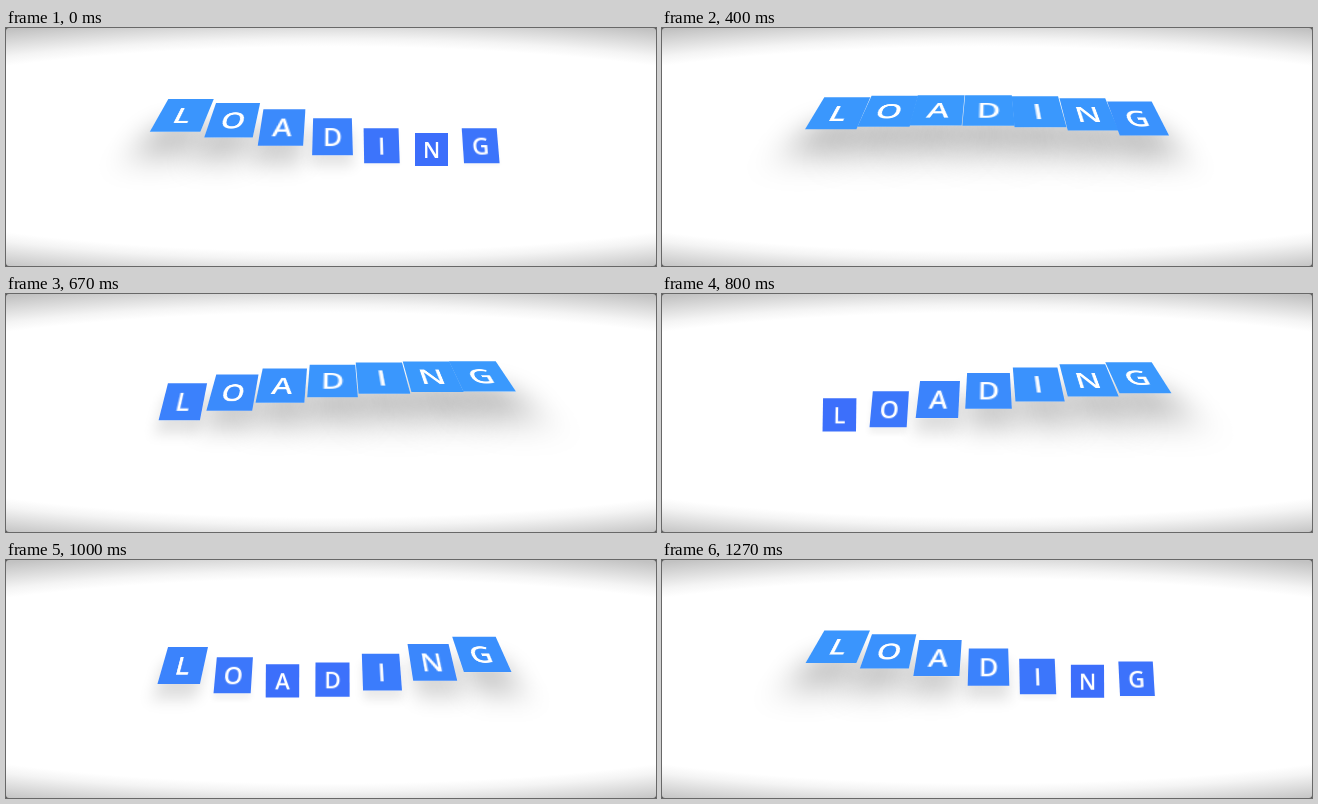
Recreate the animation shown at these times as an HTML page. Size 650 by 238 pixels, loop 1.34 s.

```html
<!DOCTYPE html>
<html lang="en">
<head>
<meta charset="utf-8">
<title>Loading</title>
<style>
html, body { margin: 0; width: 100%; height: 100%; overflow: hidden; background: #555; }
.stage {
  position: relative; width: 650px; height: 238px; overflow: hidden; border-radius: 3px;
  background: radial-gradient(717px 133px at 325px 121px, #fff 77%, #f4f4f4 83%, #c2c2c2 100%);
}
.row { position: absolute; left: 161px; top: 105px; width: 330px; height: 33px; perspective: 200px; }
.row span {
  position: absolute; width: 33px; height: 33px;
  font: 600 22px/33px "Open Sans", "Noto Sans", sans-serif;
  text-align: center; color: #fff;
}
</style>
</head>
<body>
<div class="stage">
  <div class="row" id="shadows"></div>
  <div class="row" id="tiles"></div>
</div>
<script>
const WORD = "LOADING", SPACING = 49.5;
const HALF = 600, DELAY = 75, LEAD = 1575;
const LOOP = 1340, FPS = 15, LAST = 19, LAST_POSE = 1213;

const lift = ["scale(1) translateY(0) rotateX(0deg)", "scale(1.5) translateY(-26.7px) rotateX(45deg)"];
const layers = {
  shadows: { boxShadow: ["0 0 0 0 rgba(0,0,0,0)", "0 25px 25px 0 rgba(0,0,0,.27)"] },
  tiles: { backgroundColor: ["#3c6efb", "#3a99fd"] }
};

const parts = [];
for (const [id, look] of Object.entries(layers)) {
  [...WORD].forEach((letter, i) => {
    const span = document.createElement("span");
    span.style.left = i * SPACING + "px";
    if (id === "tiles") span.textContent = letter;
    document.getElementById(id).append(span);
    const motion = span.animate({ transform: lift, ...look },
      { duration: HALF, easing: "ease", direction: "alternate", iterations: Infinity });
    motion.pause();
    parts.push({ motion, offset: LEAD - i * DELAY });
  });
}

// The poses advance in steps of 1/15 s; the last one is cut short.
function draw(now) {
  const step = Math.min(LAST, Math.floor((now % LOOP + 3.4) * FPS / 1000));
  const time = Math.min(step * 1000 / FPS, LAST_POSE);
  for (const { motion, offset } of parts) motion.currentTime = time + offset;
}

let start;
function tick(now) {
  start ??= now;
  draw(now - start);
  requestAnimationFrame(tick);
}
draw(0);
requestAnimationFrame(tick);
</script>
</body>
</html>
```
